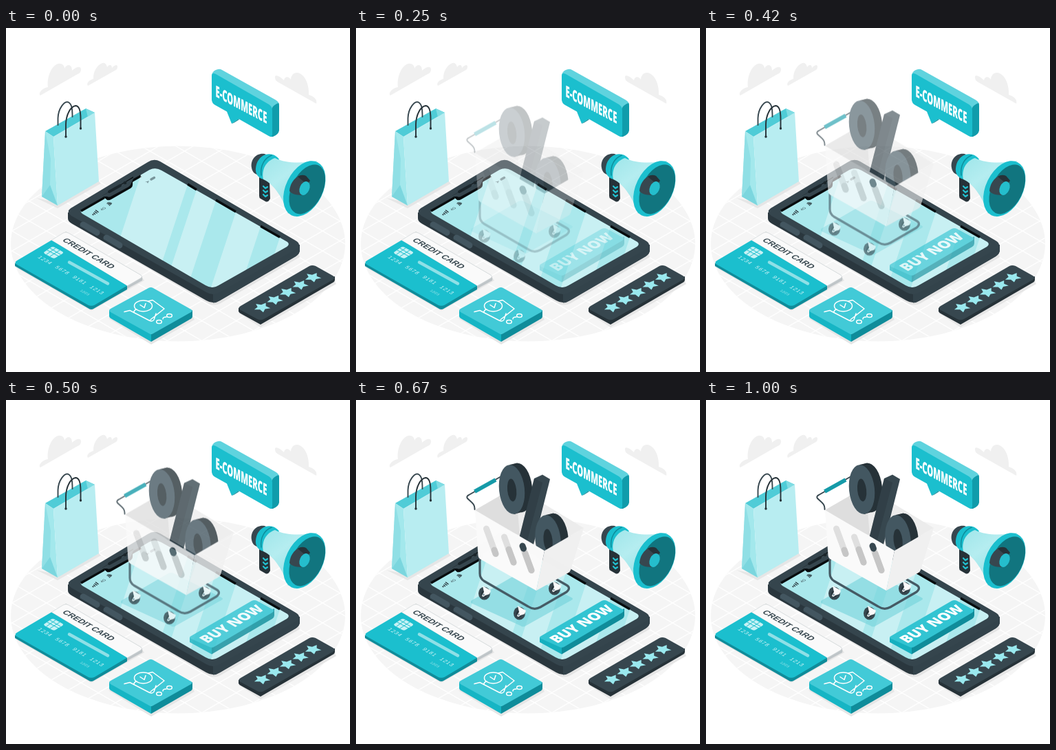
An HTML page for the animation above (1040 ms loop, 500 by 500 pixels).

```html
<!DOCTYPE html>
<html lang="en">
<head>
<meta charset="utf-8">
<title>E-commerce</title>
<style>
  html, body { margin: 0; width: 100%; height: 100%; overflow: hidden; background: #fff; }
  svg { display: block; width: 100vw; height: 100vh; }
  text { font-family: "Liberation Sans", Arial, sans-serif; }
  .bold { font-family: "Open Sans", sans-serif; font-weight: 800; fill: #fff; }
  .line { fill: none; stroke-linecap: round; stroke-linejoin: round; }
  .flat { stroke-linecap: butt; }
  .dark { fill: #263238; }
  .slate { fill: #37474f; }
  .teal { fill: #1bbfce; }
  .deep { fill: #0f8c9a; }
</style>
</head>
<body>
<svg viewBox="0 0 500 500" xmlns="http://www.w3.org/2000/svg">
  <defs>
    <clipPath id="floorClip"><ellipse cx="250" cy="313.5" rx="243" ry="142"/></clipPath>
    <clipPath id="screenClip"><path id="glass" d="M110 264 L208 206.500 Q217 202 226 207 L409 311 Q413 314.500 408 318 L309 374 Q300 380 290 374 L111 270 Q107 267 110 264Z"/></clipPath>
    <linearGradient id="bell" x1="0" y1="0" x2=".7" y2="1">
      <stop offset="0" stop-color="#9fe6ea"/><stop offset=".4" stop-color="#b5edf0"/><stop offset="1" stop-color="#8adde3"/>
    </linearGradient>
    <g id="zero">
      <path class="dark" d="M-3 -36 L8 -38.500 L14 33 L3 36Z"/>
      <ellipse class="dark" cx="11" cy="-2.500" rx="18.500" ry="36" transform="rotate(-6 11 -2.500)"/>
      <ellipse fill="#435761" rx="18.500" ry="36" transform="rotate(-6)"/>
      <ellipse class="dark" cx="0" cy="1" rx="6.500" ry="16.500" transform="rotate(-6)"/>
    </g>
    <g id="wheel">
      <ellipse class="slate" cx="-.5" cy="1" rx="8.500" ry="9.500"/>
      <ellipse class="dark" cx="-1" cy="2" rx="4" ry="5"/>
      <path fill="#fafafa" d="M-3 -10 L9 -3 L7 2 L1 4 Q-3 8 -4 4 L-1 -1Z"/>
      <circle cx="-1.500" cy="3" r="1.400" fill="#78909c"/>
    </g>
  </defs>

  <!-- floor -->
  <ellipse cx="250" cy="313.5" rx="243" ry="142" fill="#f5f5f5"/>
  <path id="grid" class="line" stroke="#fff" stroke-width="1.300" clip-path="url(#floorClip)"/>

  <!-- clouds -->
  <g fill="#f0f0f0">
    <path d="M50 98 C46 95 53 87 61 86 C59 72 66 54 76 52 C82 51 85 55 85 59 C88 52 96 52 96 62 C102 56 109 55 109 60 C109 64 107 66 104 67Z"/>
    <path d="M119 84 C116 80 122 75 127 74 C126 64 133 53 140 51 C144 50 146 53 147 57 C150 52 154 53 154 58 C158 53 163 53 162 57 C162 60 160 61 158 62Z"/>
    <path d="M451 110 C453 104 447 99 440 97 C441 82 434 66 423 65 C417 65 414 70 414 75 C411 70 405 70 404 76 C398 70 391 67 391 71 C391 76 393 77 396 79Z"/>
  </g>

  <!-- speech bubble -->
  <path fill="#5fd3de" d="M299 68 Q301 61 308 60 Q311 59 314 61 L391 104 Q397 107 397 112 L388 120 L302 73Z"/>
  <path fill="#109cab" d="M386 118 Q388 112 396 109 Q397 110 397 113 L397 149 Q396 155 388 158 L384 158Z"/>
  <path class="teal" d="M299 70 Q299 64 305 67 L382 111 Q387 114 387 120 L387 154 Q387 160 382 157 L338 132 L328 139 L321 121.500 L304 112 Q299 109 299 104Z"/>
  <path class="deep" d="M328 139 L338 132 L339 133 L331 138Z"/>
  <text class="bold" transform="matrix(.49 .26 0 1 304.500 99.500)" font-size="23">E-COMMERCE</text>

  <!-- shopping bag -->
  <path fill="#e6e6e6" d="M44 247 L75 262 L138 226 L134 222 L75 254Z"/>
  <path fill="#4fccd7" d="M57 150 L116 117 L129 123 L69 158Z"/>
  <path fill="#7fdce3" d="M116 117 L129 123 L119 130Z"/>
  <path class="line" stroke="#37474f" stroke-width="1.900" d="M75.500 141 V131 C76 117 85 105 91 108 C96 111 96.500 119 96.500 129"/>
  <path fill="#a3e8ec" d="M57 150 L69 158 L75 258 L52 245Z"/>
  <path fill="#90dfe5" d="M57 150 L65 190 L64 228 L52 245Z"/>
  <path fill="#7bd6de" d="M52 245 L64 228 L75 258Z"/>
  <path fill="#b8edf1" d="M69 158 L129 123 L135 223 L75 258Z"/>
  <path class="line" stroke="#263238" stroke-width="1.900" d="M87 158 V141 C87 126 94 114 101 113 C107 113 108.500 122 108.500 132 V146"/>
  <circle class="dark" cx="87" cy="158" r="1.700"/><circle class="dark" cx="108.500" cy="146" r="1.700"/>

  <!-- phone -->
  <path fill="#e4e4e4" d="M92 282 L290 398 Q301 406 312 400 L427 333 L420 318 L300 380Z"/>
  <path fill="#2a373e" d="M90 268 V277 Q90 281 96 284.500 L291 396 Q301 402 311 396 L421 332 Q427 328 427 323 V315Z"/>
  <path fill="#33434b" d="M301 385 V399.500 Q306 399.500 311 396 L421 332 Q427 328 427 323 V315Z"/>
  <path fill="#35454d" d="M94 262 L206 195 Q215 189 224 194 L421 309 Q431 315 421 322 L311 384 Q301 390 291 384 L95 273 Q87 267 94 262Z"/>
  <use href="#glass" fill="#aae8ec"/>
  <path class="line flat" stroke="#080c0e" stroke-width="3.500" d="M109 266 L143 246.500 M182 223 L196 215 M264 227 L277 235 M305 250 L334 267 M370 288 L398 304"/>
  <path fill="#080c0e" d="M140 244 L147 250 Q150 251 153 249 L181 233 Q185 230 184 225 L185 216Z"/>
  <path id="shine" fill="#fff" fill-opacity=".35" clip-path="url(#screenClip)"/>
  <path fill="#35454d" d="M138 245 L186 217 L182 226 Q181 229 178 231 L154 244 Q150 247 147 245Z"/>
  <path class="line" stroke="#1b262b" stroke-width="4" d="M150 238 L166 229"/>
  <circle cx="173" cy="225" r="2.300" fill="#1b262b"/>
  <path class="line" stroke="#435660" stroke-width="9" d="M112 286 L132 297.500 M146 305 L165 316"/>
  <path class="line" stroke="#2a383f" d="M109 289 L131 302 M143 308 L164 320.500"/>
  <g fill="#37474f">
    <path class="line" stroke="#263238" stroke-width="1.400" d="M126 271 L127 271.500 M127.500 269 L129.500 270.500 M129 267 L132 269 M130.500 265 L134 267.500"/>
    <text transform="matrix(.866 -.5 .866 .5 139.500 265.500)" font-size="5.500">4G</text>
    <path class="line" stroke="#263238" stroke-width="1.200" d="M147 255 Q149 252.500 153.500 255 M148.500 256 Q150 254.500 152.500 256.300"/>
    <circle cx="150.500" cy="257.500" r="1"/>
    <path fill="#78949a" d="M202 224 L208 222 L206 226 L205 224Z"/>
    <path class="line" stroke="#78949a" stroke-width="3.400" d="M211 220 L215.500 217.500"/>
  </g>

  <!-- credit card -->
  <path fill="#e6e6e6" d="M14 348 L124 411 L201 367 L194 358Z"/>
  <path fill="#bfc5c8" d="M87 296 L196 359 Q199 362 198 367 L176 379 L66 315Z"/>
  <path class="deep" d="M13 342 V346 L119 407 Q124 411 129 407 L176 380 V371Z"/>
  <path fill="#fafafa" stroke="#cfd4d6" stroke-width=".7" d="M66 308.500 L83 298 Q87 295.500 91 298 L195 358.500 Q200 361.500 195 364 L176 375Z"/>
  <path class="teal" d="M66 308.500 L176 374.500 L129 402.500 Q124 405 119 402.500 L16 344 Q11 341 16 338Z"/>
  <text transform="matrix(.866 .5 -.866 .5 81 309)" font-size="12" font-weight="700" fill="#37474f">CREDIT CARD</text>
  <path fill="#c8f2f5" d="M55 326 L66 318.500 Q68 317.500 70 318.500 L82 325 Q84 326.500 82 328 L72 334 Q70 335.500 67 334 L56 328Z"/>
  <path class="line" stroke="#1bbfce" stroke-width="1" d="M60 323 L77 332 M64 320 L79 329 M72 320 L59 329 M78 323 L64 332"/>
  <path class="line" stroke="#8fe0e7" stroke-width="4.500" d="M92 340.500 L148 371.500"/>
  <text transform="matrix(.866 .5 -.866 .5 45.500 333.500)" font-size="8" letter-spacing=".9" word-spacing="4.500" fill="#d9f6f8">1234 5678 9181 1213</text>
  <text transform="matrix(.866 .5 -.866 .5 107 382)" font-size="5.500" fill="#a9e8ed">12/23</text>

  <!-- cart tile -->
  <path fill="#e6e6e6" d="M149 422 L211 460 L274 424 L268 414Z"/>
  <path fill="#16b5c4" d="M150 410 V419 Q150 421 153 422.500 L211 456 V445Z"/>
  <path class="deep" d="M211 445 V456 L269 422.500 Q271 421 271 419 V410Z"/>
  <path fill="#42cad7" d="M152 408 L207 378 Q210.500 376 214 378 L269 409 Q272 411 269 413 L214 444 Q211 446 208 444 L152 413 Q148 410.500 152 408Z"/>
  <g class="line" stroke="#fff" stroke-width="1.500">
    <path d="M172 412.500 L180 410.500 L208 425 Q213 427.500 215 424 L218 415 M207 397 L213 395.500 L230 408 L210 424 M186 413 Q186 410 190 409 M228 423 Q228 420 233 420"/>
    <ellipse cx="199.500" cy="404" rx="13" ry="8"/>
    <path d="M195 402.500 L201 406.500 L203 400.500"/>
    <ellipse cx="237.500" cy="418" rx="3.800" ry="2.500"/>
    <ellipse cx="222.500" cy="427" rx="3.800" ry="2.500"/>
  </g>

  <!-- rating bar -->
  <path fill="#e6e6e6" d="M338 414 L370 435 L480 372 L474 362Z"/>
  <path class="dark" d="M338 407 V412 Q339 414 342 415.500 L370 431 L476 369.500 Q478 368 478 366 V361Z"/>
  <path class="slate" d="M341 404 L441 346 Q445 344 450 346 L475 360 Q480 363 475 366 L374 423.500 Q370 425 366 423.500 L341 410 Q336 407 341 404Z"/>
  <g id="stars" fill="#9ae9ef"></g>

  <!-- megaphone -->
  <path class="dark" d="M368 217 L383 223 L384 248 Q381 254 377 252 L370 248 Q368 247 368 244Z"/>
  <path class="line" stroke="#22bfce" stroke-width="2.200" d="M374 230 L377 233 L380 231 M374 236 L377 239 L380 237 M374 242 L377 245 L380 243"/>
  <path class="slate" d="M376 183 C364 181 355 191 357 203 C358 210 363 214 369 213 L384 187Z"/>
  <path class="teal" d="M377 184 C387 181 395 187 397 191 L375 220 C366 219 362 210 363 204 C364 194 369 187 377 184Z"/>
  <path class="line" stroke="#0f8c9a" stroke-width="1.500" d="M386 185 C376 189 369 200 371 214"/>
  <path fill="url(#bell)" d="M391 189 C408 198 434 196 452 193 L410 270 C404 250 390 227 374 220 C371 206 378 193 391 189Z"/>
  <g transform="rotate(26 433.500 234)">
    <ellipse class="teal" cx="433.500" cy="233.500" rx="27" ry="43"/>
    <ellipse cx="437.500" cy="232.500" rx="22.500" ry="38.500" fill="#11757f"/>
  </g>
  <path class="slate" d="M412 237 C413 223 424 211 436 215 L442 222 L430 243 C420 243 414 240 412 237Z"/>
  <path class="dark" d="M424 216 Q430 212 436 215 L442 222 L436 226Z"/>
  <ellipse cx="434" cy="233" rx="7" ry="10.500" transform="rotate(24 434 233)" fill="#25bdcc"/>

  <!-- buy button -->
  <g id="button">
    <path fill="#16b0bf" d="M267 345 V352 L299 369.500 V359Z"/>
    <path class="deep" d="M299 359 V369.500 L387 318 Q390 316 390 313 V303Z"/>
    <path fill="#32c4d2" d="M269 343 L357 292 Q361 290 365 292 L387 304 Q391 306 387 309 L303 358.500 Q299 361 295 358.500 L269 347 Q265 345 269 343Z"/>
    <text class="bold" transform="matrix(.78 -.46 .866 .5 292.500 354)" font-size="21.500">BUY NOW</text>
  </g>

  <path id="shade" fill="#72d2da" fill-opacity=".6" d="M167 292 L236 252 Q240 250 244 252 L313 287 Q317 289 313 291 L247 328 Q243 331 239 328 L167 295Z"/>

  <!-- cart with percent sign -->
  <g id="cart">
    <path class="line" stroke="#455a64" stroke-width="3.200" d="M180 230 V252 Q180 259 186 263 L250 300 Q259 306 268 301 L306 279 Q313 273 306 269 L292 261"/>
    <use href="#wheel" x="187" y="280"/>
    <use href="#wheel" x="238" y="309"/>
    <use href="#wheel" x="289" y="273"/>
    <path class="line" stroke="#37474f" stroke-width="2" d="M172.500 159 C173 151 168 149 162 143 Q160 140 164 138 L210 111.500"/>
    <path class="line flat" stroke="#159aa8" stroke-width="6" d="M172.500 133 L203 116"/>
    <path fill="#ececec" d="M173 160 L232 126 L331 186 L274 219Z"/>
    <path fill="#dedede" d="M173 160 L232 126 L238 197 L220 190Z"/>
    <use href="#zero" x="226.500" y="130"/>
    <path class="slate" d="M259 114 L271 108.500 L282 115 L257 214 L236 205Z"/>
    <path class="dark" d="M259 114 L271 120 L247 211 L236 205Z" fill-opacity=".35"/>
    <use href="#zero" x="279" y="203"/>
    <path fill="#fafafa" d="M173 160 L274 219 L262 277 L182 232 Q178 230 177.500 226Z"/>
    <path fill="#f0f0f0" d="M274 219 L331 186 L312 247 Q311 250 308 251.500 L262 277Z"/>
    <g class="line" stroke-width="9">
      <path stroke="#dfdfdf" d="M189.500 187 L203 223.500 M215.500 199 L229 236 M242 213 L255 247.500"/>
      <path stroke="#c6c6c6" d="M201 218 L203 223.500 M222 217 L229 236 M246 223 L255 247.500"/>
      <path stroke="#37474f" d="M242 212 L243.500 216"/>
    </g>
  </g>
</svg>
<script>
  const $ = id => document.getElementById(id);

  // isometric floor grid
  let grid = "";
  for (let y = -290; y < 800; y += 29) grid += `M0 ${y}l500 289M0 ${y + 10}l500-289`;
  $("grid").setAttribute("d", grid);

  // slanted reflections: left and right x on the upper screen edge
  const edgeY = x => x < 216 ? 204 + (216 - x) * .577 : 202 + (x - 220) * .575;
  const ray = x => [x + 10, edgeY(x) - 30, x - 57, edgeY(x) + 173];
  $("shine").setAttribute("d", [[195, 264], [277, 305], [334, 370], [398, 440]].map(([a, b]) => {
    const p = ray(a), q = ray(b);
    return `M${p[0]} ${p[1]}L${q[0]} ${q[1]} ${q[2]} ${q[3]} ${p[2]} ${p[3]}Z`;
  }).join(""));

  // five stars lying on the bar
  const star = Array.from({ length: 10 }, (_, i) => {
    const r = i % 2 ? 5.2 : 10.2, a = i * Math.PI / 5;
    return `${(r * Math.sin(a)).toFixed(2)},${(-r * Math.cos(a)).toFixed(2)}`;
  }).join(" ");
  $("stars").innerHTML = [0, 1, 2, 3, 4].map(i =>
    `<polygon points="${star}" transform="matrix(.866 -.5 .866 .5 ${372 + i * 18.5} ${406 - i * 10.9})"/>`).join("");

  const LOOP = 1040, STEP = 125 / 3;
  const timing = { duration: 1000, fill: "both", easing: "cubic-bezier(.36,-.01,.5,1.38)" };
  const fade = { opacity: [0, 1] };
  const rise = { ...fade, transform: ["translateY(30px)", "translateY(0px)"] };
  const parts = [[$("cart"), rise], [$("button"), fade], [$("shade"), fade]].map(([el, keys]) => {
    const anim = el.animate(keys, timing);
    anim.pause();
    return anim;
  });

  const start = performance.now();
  function draw() {
    const t = (performance.now() - start) % LOOP;
    const step = Math.min(24, Math.floor((t + 4.9) / STEP));
    for (const anim of parts) anim.currentTime = step ? (step + 1) * 40 : 0;
    requestAnimationFrame(draw);
  }
  draw();
</script>
</body>
</html>
```
